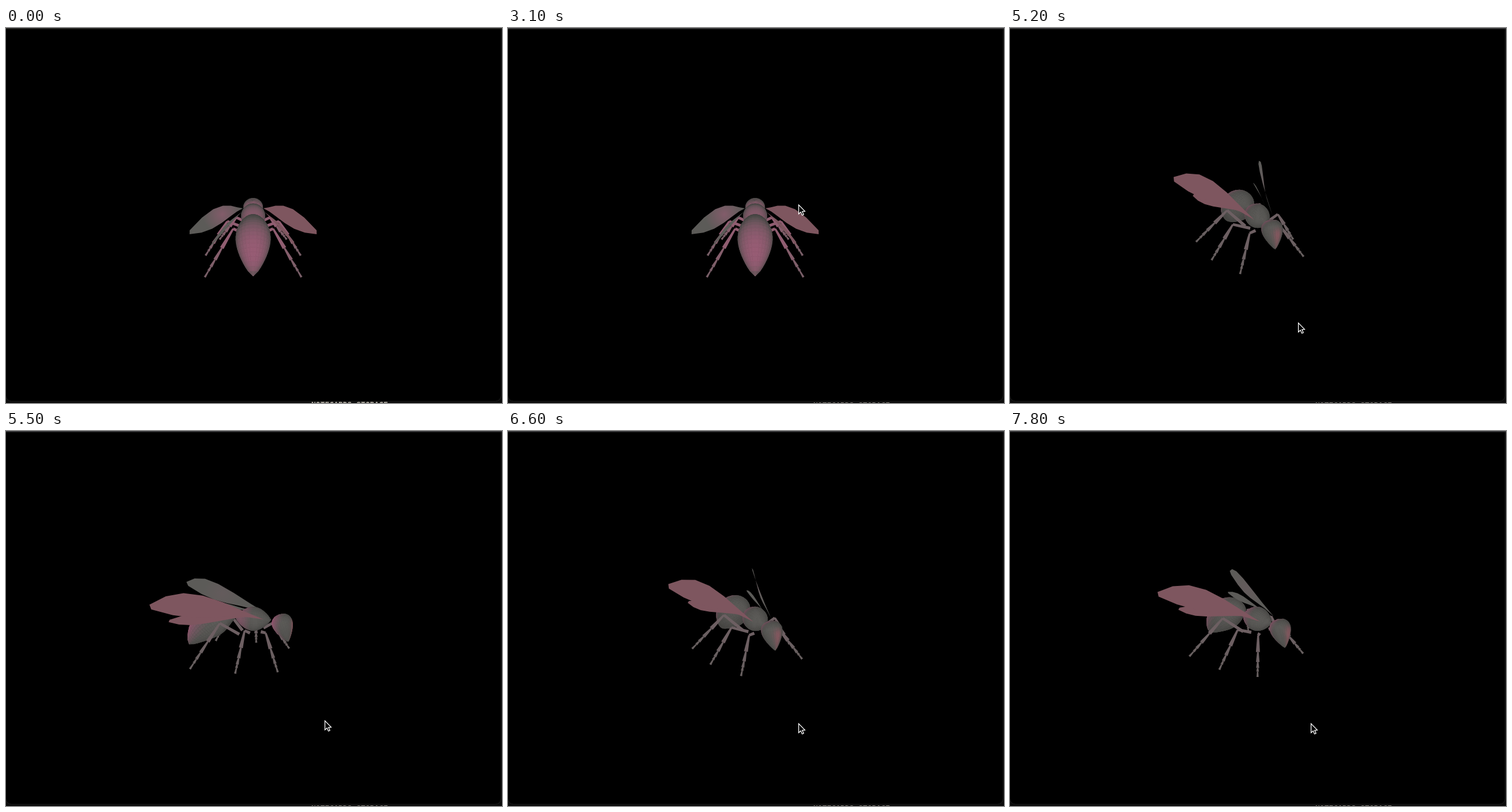
An HTML page with a canvas that plays this animation: 861x651 px, repeating every 8000 ms.

```html
<!DOCTYPE html>
<html lang="en">
<head>
<meta charset="utf-8">
<title>Wasp model viewer</title>
<style>
  html, body { margin: 0; width: 861px; height: 651px; overflow: hidden; background: #000; }
  canvas { display: block; }
</style>
</head>
<body>
<canvas id="stage" width="861" height="651"></canvas>
<script>
const ctx = document.getElementById('stage').getContext('2d');
const LOOP = 8000, STEP = 100, CAMERA = 970, RAD = Math.PI / 180;
const DRAG_START = 4900, DRAG_X = 664, DRAG_RATE = 0.92;
const GRAY = [91, 90, 87], PINK = [168, 92, 124], ROSE = [168, 92, 106];
const ROSE_WING = [126, 86, 95], GRAY_WING = [92, 91, 88];

// Pointer stops: time, x, y
const POINTER = [
  [300, 600, 660], [1000, 504, 306], [3800, 504, 306], [DRAG_START, DRAG_X, 506],
  [5200, 500, 511], [5500, 553, 502], [6500, 560, 503], [6600, 504, 507],
  [7000, 494, 510], [7300, 504, 507], [7700, 504, 507], [7800, 522, 507]
];

const lerp = (a, b, u) => a + (b - a) * u;
const mix = (p, q, u) => p.map((v, i) => lerp(v, q[i], u));
const bump = (u, skew, power) => Math.max(0, Math.sin(Math.PI * u ** skew)) ** power;
const rgb = c => `rgb(${c.map(Math.round).join(',')})`;
const mirror = points => points.map(([x, y, z]) => [-x, y, z]);

// Body profiles: position u along the axis gives height, depth, radius
const abdomen = u => [6 - 61 * u ** 2.1, 28 + 90 * u, 28 * bump(u, 1.05, 0.7)];
const thorax = u => [-1, -31 + 62 * u, 20.5 * bump(u, 1, 0.8)];
const head = u => [9 - 47 * u, -46 - 16 * u, 17.5 * bump(u, 0.6, 0.8)];

// A blade bowed between root and tip, widest beyond its middle
function wingOutline(root, tip, bow, half) {
  const edge = sign => Array.from({ length: 7 }, (_, i) => {
    const u = i / 6, width = sign * Math.sin(2.95 * u ** 1.4), arch = Math.sin(Math.PI * u);
    return mix(root, tip, u).map((v, k) => v + arch * bow[k] + width * half[k]);
  });
  return [...edge(1), ...edge(-1).reverse()];
}
const FOREWING = wingOutline([18, 4, -22], [93, 35, 150], [-6, 10, 4], [-2, 20, 8]);
const HINDWING = wingOutline([20, 8, 5], [64, 5, 130], [3, 1, 4], [-5, 9, -3]);

// Hip, knee and foot of leg i, counted from the front
const legJoints = i => [
  [12, -20 - 3.5 * i, -16 + 19 * i],
  [30 + 28.5 * i - 13.5 * i * i, -16 + 6.5 * i, -28 + 26 * i + 6.75 * i * i],
  [63 + 34 * i - 13 * i * i, -72, -55 + 61 * i + 6 * i * i]
];

let yaw = 0, pitch = 0, behind = 1;

function rotate([x, y, z]) {
  const c = Math.cos(yaw), s = Math.sin(yaw), cp = Math.cos(pitch), sp = Math.sin(pitch);
  const near = x * s + z * c;
  return [x * c - z * s, y * cp - near * sp, near * cp + y * sp];
}

function project(p) {
  const [x, y, d] = rotate(p), k = CAMERA / (CAMERA - d);
  return [429 + x * k, 325 - y * k, d];
}

function tracePolygon(points) {
  ctx.beginPath();
  points.forEach(([x, y]) => ctx.lineTo(x, y));
  ctx.closePath();
}

function buildLathe(profile) {
  const SIDES = 28, RINGS = 22, D = 0.01;
  const rings = Array.from({ length: RINGS + 1 }, (_, i) => {
    const u = i / RINGS, [y, z, r] = profile(u);
    const a = profile(Math.max(0, u - D)), b = profile(Math.min(1, u + D));
    const length = Math.hypot(b[0] - a[0], b[1] - a[1]);
    const [ty, tz, slope] = a.map((v, k) => (b[k] - v) / length);
    return Array.from({ length: SIDES }, (_, j) => {
      const angle = j / SIDES * 2 * Math.PI, c = Math.cos(angle), s = Math.sin(angle);
      const normal = [c, s * tz - ty * slope, -s * ty - tz * slope];
      const size = Math.hypot(...normal);
      return { point: [c * r, y + s * tz * r, z - s * ty * r], normal: normal.map(n => n / size) };
    });
  });
  const faces = [];
  for (let i = 0; i < RINGS; i++) {
    for (let j = 0; j < SIDES; j++) {
      const k = (j + 1) % SIDES;
      const corners = [rings[i][j], rings[i][k], rings[i + 1][k], rings[i + 1][j]];
      faces.push({
        points: corners.map(v => v.point),
        normal: [0, 1, 2].map(m => corners.reduce((sum, v) => sum + v.normal[m] / 4, 0)),
        tint: 0.85 * (1 - (i / RINGS) ** 12),
        isHead: profile === head
      });
    }
  }
  return faces;
}

function shade({ normal, tint, isHead }, facing) {
  const lit = Math.max(0, normal[1] * 0.1 + normal[2] * 0.99) ** 1.1;
  const base = GRAY.map(v => v * (0.74 + 0.28 * Math.max(0, facing)));
  const color = mix(base, PINK, lit * tint);
  return isHead ? mix(color, ROSE, 0.6 * Math.max(0, -normal[2]) ** 10) : color;
}

function drawLathe(faces) {
  ctx.lineWidth = 0.7;
  faces.map(face => ({ face, points: face.points.map(project), facing: rotate(face.normal)[2] }))
    .filter(f => f.facing > -0.2)
    .sort((a, b) => a.points[0][2] - b.points[0][2])
    .forEach(({ face, points, facing }) => {
      ctx.fillStyle = ctx.strokeStyle = rgb(shade(face, facing));
      tracePolygon(points);
      ctx.fill();
      ctx.stroke();
    });
}

function drawWing(points, isRight, isFore) {
  const flat = points.map(project);
  ctx.fillStyle = rgb(ROSE_WING);
  if (!isRight) {
    const [x, y] = mix(flat[3], flat[10], 0.5);
    const glow = ctx.createRadialGradient(x, y, 0, x, y, 34);
    glow.addColorStop(0, rgb(mix(GRAY_WING, PINK, isFore ? 0.1 + 0.4 * behind : 0)));
    glow.addColorStop(1, rgb(GRAY_WING));
    ctx.fillStyle = glow;
  }
  tracePolygon(flat);
  ctx.fill();
}

function drawSpindle(a, b, startWidth, endWidth) {
  const dx = b[0] - a[0], dy = b[1] - a[1], length = Math.hypot(dx, dy) || 1;
  const nx = -dy / length / 2, ny = dx / length / 2;
  tracePolygon([
    [a[0] + nx * startWidth, a[1] + ny * startWidth], [b[0] + nx * endWidth, b[1] + ny * endWidth],
    [b[0] - nx * endWidth, b[1] - ny * endWidth], [a[0] - nx * startWidth, a[1] - ny * startWidth]
  ]);
  ctx.fill();
}

function legColor(u) {
  return rgb(mix([98, 95, 93], PINK, (0.15 + 0.5 * behind) * (1 - 0.6 * u)));
}

function drawThigh(hip, knee) {
  ctx.fillStyle = legColor(0);
  drawSpindle(project(hip), project(knee), 5.5, 4.5);
}

// Each part of the shin is shorter than the one above and flares downwards
function drawShin(knee, foot) {
  const start = project(knee), end = project(foot);
  for (let i = 0, u = 0; i < 5; i++) {
    const next = i < 4 ? lerp(u, 1, 0.4) : 1;
    ctx.fillStyle = legColor(u);
    drawSpindle(mix(start, end, u), mix(start, end, next), 3.2 - i * 0.2, 7 - i * 0.8);
    u = next;
  }
}

const parts = [[abdomen, 0.5], [thorax, 0.5], [head, 0.3]].map(([profile, middle]) => {
  const faces = buildLathe(profile), [y, z] = profile(middle);
  return { center: [0, y, z], draw: () => drawLathe(faces) };
});
for (const isRight of [true, false]) {
  const side = isRight ? points => points : mirror;
  for (const shape of [FOREWING, HINDWING]) {
    const wing = side(shape);
    parts.push({ center: mix(wing[0], wing[1], 0.5), draw: () => drawWing(wing, isRight, shape === FOREWING) });
  }
  for (let i = 0; i < 3; i++) {
    const [hip, knee, foot] = side(legJoints(i));
    parts.push({ center: mix(hip, knee, 0.5), draw: () => drawThigh(hip, knee) });
    parts.push({ center: mix(knee, foot, 0.5), draw: () => drawShin(knee, foot) });
  }
}

function pointerAt(t) {
  const next = POINTER.findIndex(stop => stop[0] > t);
  if (next <= 0) return POINTER[next ? POINTER.length - 1 : 0].slice(1);
  const a = POINTER[next - 1], b = POINTER[next], u = (t - a[0]) / (b[0] - a[0]);
  return mix(a, b, (1 - Math.cos(u * Math.PI)) / 2).slice(1);
}

function drawWindow(focused) {
  ctx.fillStyle = '#0b0b0b';
  ctx.fillRect(0, 0, 861, 651);
  ctx.font = 'bold 13px "DejaVu Sans Mono", monospace';
  ctx.fillStyle = focused ? '#8a867e' : '#b5b0a6';
  ctx.fillText('NOTECARDS STORAGE', 530, focused ? 659 : 658);
  ctx.beginPath();
  ctx.roundRect(-0.5, 1, 860, 647, [0, 0, 10, 10]);
  ctx.fillStyle = '#000';
  ctx.fill();
  ctx.strokeStyle = '#1e1e1e';
  ctx.lineWidth = 1;
  ctx.stroke();
  ctx.fillStyle = focused ? '#343436' : '#262624';
  ctx.fillRect(0, 0, 861, 2);
}

function drawPointer(x, y) {
  ctx.save();
  ctx.translate(x + 0.6, y + 1);
  tracePolygon([[0, 0], [0, 15.8], [3.6, 12.5], [6, 18], [8.6, 16.9], [6.3, 11.5], [10.8, 11.1]]);
  ctx.fillStyle = '#000';
  ctx.strokeStyle = '#fff';
  ctx.lineWidth = 1.3;
  ctx.fill();
  ctx.stroke();
  ctx.restore();
}

function render(t) {
  const [x, y] = pointerAt(t), dragging = t >= DRAG_START;
  yaw = dragging ? DRAG_RATE * (DRAG_X - x) * RAD : 0;
  behind = Math.max(0, Math.cos(yaw));
  pitch = (20 + 2.5 * behind + (dragging ? DRAG_RATE * (y - 507) : 0)) * RAD;
  drawWindow(t >= 1000);
  parts.map(part => ({ part, depth: rotate(part.center)[2] }))
    .sort((a, b) => a.depth - b.depth)
    .forEach(({ part }) => part.draw());
  drawPointer(x, y);
}

const startTime = performance.now();
let shown = -1;
function tick() {
  const t = Math.floor((performance.now() - startTime) % LOOP / STEP) * STEP;
  if (t !== shown) render(shown = t);
  requestAnimationFrame(tick);
}
tick();
</script>
</body>
</html>
```
